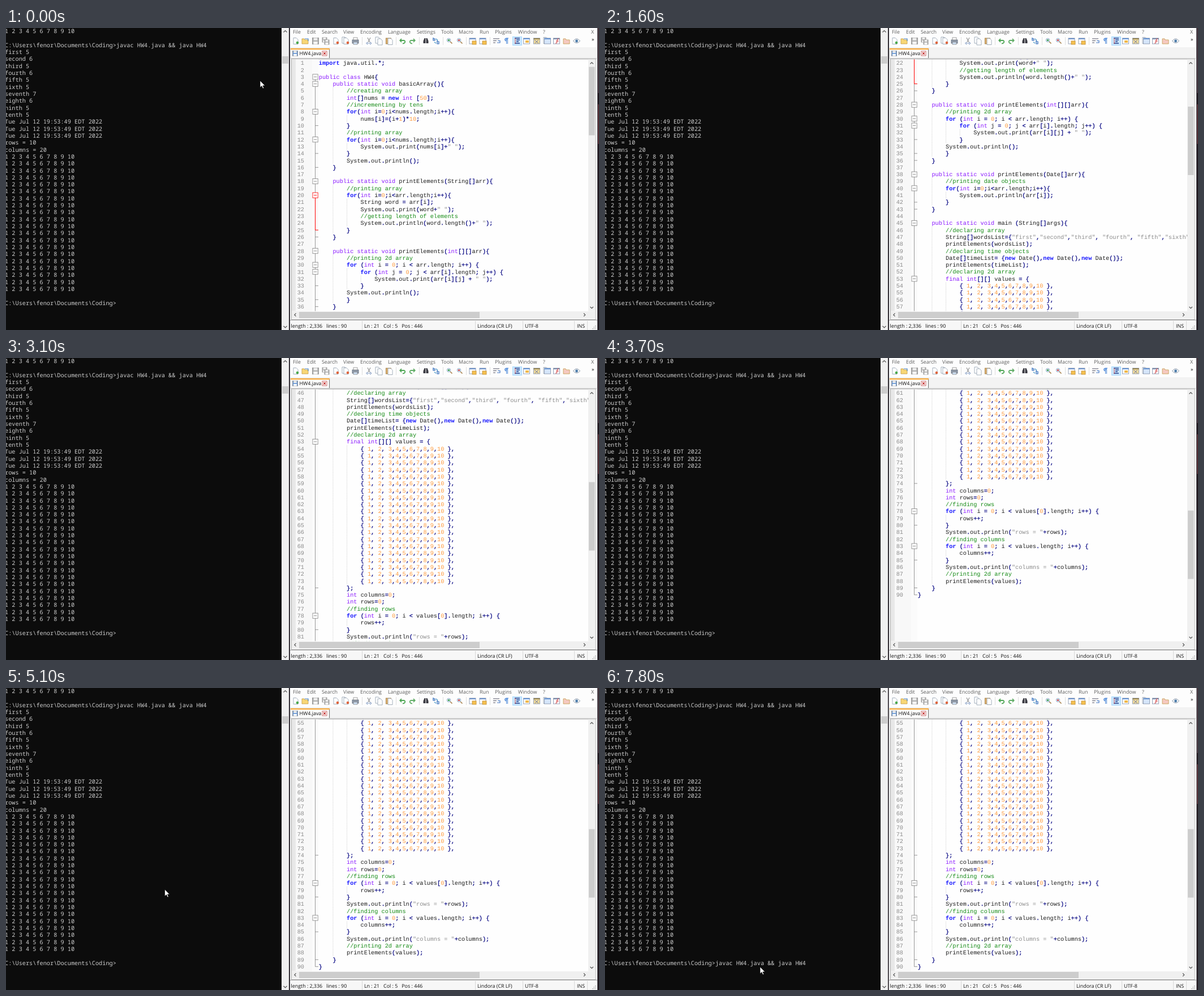
Animation of 1048 by 534 pixels, one loop 8000 ms. Source, as an HTML page:

```html
<!DOCTYPE html>
<html lang="en">
<head>
<meta charset="utf-8">
<title>Console and editor</title>
<style>
html, body { margin: 0; width: 100%; height: 100%; overflow: hidden; background: #0c0c0c; }
svg { display: block; width: 1048px; height: 534px; }
text { white-space: pre; text-rendering: geometricPrecision; }
.con { font: 10.26px "Noto Sans Mono", "DejaVu Sans Mono", monospace; fill: #ccc; }
.code { font: 10.26px "Liberation Mono", "Courier New", monospace; fill: #1c1c1c; }
.ui { font: 8.9px "Open Sans", "Noto Sans", sans-serif; fill: #111; }
.menu { fill: #5c5c5c; }
.num { fill: #8a8a8a; }
.note { fill: #148a14; }
.str { fill: #8c8c8c; }
.key { fill: #1414ff; font-weight: bold; }
.type { fill: #8a18ff; }
.digit { fill: #ff9a3c; }
.op { fill: #000080; stroke: #000080; stroke-width: 0.25px; }
</style>
</head>
<body>
<svg id="stage" viewBox="0 0 1048 534">
  <clipPath id="page"><rect x="505" y="55.5" width="524" height="445"/></clipPath>
</svg>
<script>
const stage = document.getElementById('stage');
const LOOP = 8000, ROW = 12.31, PITCH = 6.154;

function el(parent, tag, attrs, text) {
  const node = document.createElementNS('http://www.w3.org/2000/svg', tag);
  for (const k in attrs) node.setAttribute(k, attrs[k]);
  if (text !== undefined) node.textContent = text;
  parent.appendChild(node);
  return node;
}
const rect = (x, y, width, height, fill, stroke = 'none', g = stage) =>
  el(g, 'rect', { x, y, width, height, fill, stroke, 'stroke-width': 0.8 });
const path = (d, stroke, fill = 'none', w = 1, g = stage) =>
  el(g, 'path', { d, stroke, fill, 'stroke-width': w });
const dot = (cx, cy, r, fill, stroke = 'none') =>
  el(stage, 'circle', { cx, cy, r, fill, stroke, 'stroke-width': 0.8 });
const label = (x, y, text, cls = 'ui', g = stage) => el(g, 'text', { x, y, class: cls }, text);

// ---------- console ----------
const PROMPT = 'C:\\Users\\fenor\\Documents\\Coding>';
const COMMAND = 'javac HW4.java && java HW4';
const COUNT = '1 2 3 4 5 6 7 8 9 10';
const conX = col => -1.95 + col * PITCH;
const conY = row => 9.1 + row * 12.32;

const output = [
  COUNT, '', PROMPT + COMMAND,
  'first 5', 'second 6', 'third 5', 'fourth 6', 'fifth 5',
  'sixth 5', 'seventh 7', 'eighth 6', 'ninth 5', 'tenth 5',
  ...Array(3).fill('Tue Jul 12 19:53:49 EDT 2022'),
  'rows = 10', 'columns = 20',
  ...Array(20).fill(COUNT), '', PROMPT
];
rect(0, 0, 500, 534, '#0c0c0c');
output.forEach((s, i) => label(conX(0), conY(i), s, 'con'));
const typed = label(conX(32), conY(39), COMMAND, 'con');
const caret = rect(0, 0, 6, 3, '#ccc');

rect(487, 0, 13, 534, '#f0f0f0');
rect(488, 50, 11, 13, '#cdcdcd');
path('M490.5 7.5l3-3 3 3M490.5 527l3 3 3-3', '#555', 'none', 1.2);

// ---------- editor window ----------
rect(500, 0, 548, 534, '#241c22');
rect(1046, 0, 2, 115, '#4a3a42');
rect(1046, 135, 2, 70, '#5a343a');
rect(502, 0, 543, 534, '#f7f7f7');
rect(502, 0, 543, 34, '#fdfdfd');
const frame = path('M501.5 0V534M1045.5 0V534', '#3c3c44');

const menus = { File: 507, Edit: 532, Search: 558, View: 596, Encoding: 626, Language: 675,
  Settings: 726, Tools: 769, Macro: 800, Run: 837, Plugins: 864, Window: 905, '?': 949, X: 1034 };
for (const name in menus) label(menus[name], 10, name, 'ui menu');

// ---------- toolbar ----------
function sheet(x, badge, y = 23) {
  path(`M${x - 4} ${y - 5.5}h5l3 3v8h-8z`, '#8f9cad', '#fff', 0.8);
  if (badge) dot(x + 3, y + 3, 2.3, badge);
}
function disk(x, y, color, s = 11) {
  rect(x - s / 2, y - s / 2, s, s, color, '#888');
  rect(x - s * 0.3, y - s / 2, s * 0.6, s * 0.4, '#eee');
  rect(x - s * 0.32, y + s * 0.1, s * 0.64, s * 0.4, '#fff');
}
function panel(x, bar, body) {
  rect(x - 5.5, 18, 11, 10, body, '#7e8da8');
  rect(x - 5.5, 18, 11, 2, bar);
}
function lens(x, color) {
  path(`M${x + 1} 24l3.5 3.5`, '#a8834e', 'none', 1.6);
  dot(x - 1.5, 21.5, 3.2, '#d5e6f5', '#86a0be');
  dot(x - 1.5, 21.5, 1.6, color);
}
function folder(x, color) {
  path(`M${x - 6} 28v-9h4l1 2h6v7z`, '#c09a48', color, 0.8);
}
function sync(x) {
  panel(x - 0.5, '#6f92c8', '#fff');
  rect(x - 1, 23, 7, 6, '#f5c050', '#c08c30');
}

for (const x of [629, 689, 730, 772, 813, 855]) rect(x, 16, 0.8, 14, '#d6d6d6');
sheet(512, '#49a94b');
folder(529, '#f8d675');
path('M528 19h6v4', '#4a86c8', 'none', 1.2);
disk(547, 23, '#b0b0b0');
disk(563, 21, '#b8b8b8', 8);
disk(567, 25, '#b0b0b0', 8);
sheet(583, '#e0643c');
sheet(598, '', 21.5);
sheet(601, '#e0643c');
rect(612, 21, 11, 6, '#8f9aaa', '#5f6a7a');
rect(614, 17, 7, 4, '#fff', '#888');
rect(614, 25, 7, 4, '#cfe2f7', '#888');
path('M639 17l4 8M644 17l-4 8', '#777');
path('M638.5 25.5a1.5 1.5 0 1 0 .1 0M644 25.5a1.5 1.5 0 1 0 .1 0', '#4a6ea8', 'none', 0.9);
sheet(657, '', 21.5);
sheet(661, '', 24.5);
rect(671.5, 18, 9, 10, '#dfb270', '#96733a');
sheet(679, '', 24);
path('M697 22h6q3 .5 2 3.5q-1 2-4 2', '#4ea656', 'none', 1.8);
path('M699 18l-4 4 4 4z', 'none', '#4ea656');
path('M722 22h-6q-3 .5-2 3.5q1 2 4 2', '#62ae68', 'none', 1.8);
path('M720 18l4 4-4 4z', 'none', '#62ae68');
path('M737.5 27v-4l2-5h2v9zM746.5 27v-4l-2-5h-2v9z', 'none', '#3a3a42');
path('M755 17v5h3v-3h-3M762 22v6h3v-4h-3', '#2764b8', 'none', 1.2);
path('M760 19l3 3M757 25l3 2', '#3a8fc0', 'none', 1.2);
lens(784, '#38a040');
lens(802, '#d84040');
sync(825);
sync(843);
path('M861 19h11M861 22.5h6M861 26h4', '#556');
path('M869 22.5h4v3.5h-5', '#3a70c0', 'none', 1.1);
path('M884.5 28v-10M886.5 28v-10M888 18h-4a2.5 2.5 0 0 0 0 5', '#4a86d6', '#9cc0ee');
rect(895.5, 15.5, 16, 15, '#cce8ff', '#99d1ff');
path('M899 18h9M902 21h6M902 24h4M899 27h9', '#26408c', 'none', 1.4);
path('M900 18v10', '#d04040', 'none', 0.9);
panel(920, '#6592d0', '#fff');
rect(918, 22, 6, 4, '#f2b94c');
panel(938, '#8f8050', '#f4dd9c');
path('M934 21l7 6M941 21l-6 6', '#6a78a0');
sheet(954, '', 22);
panel(957, '#6592d0', '#d6e6fa');
panel(973, '#7a8aa8', '#fff');
path('M971 27q3 0 3-4t3-4M972 23h5', '#d64a4a', 'none', 1.2);
folder(991, '#f6c9c0');
path('M1002.5 23q6-8 12 0q-6 7-12 0z', '#78879a', '#fff', 0.9);
dot(1008.5, 23, 2.4, '#4a7aa8');
label(1035, 23, '»');

// ---------- tab ----------
rect(502, 34, 543, 19, '#f3f3f3');
rect(503, 36, 69, 17.5, '#fbfbfb', '#cfcfcf');
rect(571, 37, 1, 16, '#777');
rect(503, 36, 69, 2.2, '#faaa3c');
disk(511, 45, '#6b9ad6', 9);
label(518.5, 48.3, 'HW4.java');
rect(559, 41, 8, 8, '#fff', '#c04848');
path('M561 43l4 4M565 43l-4 4', '#c02828', 'none', 1.2);
rect(503, 53.5, 541, 0.9, '#b4b4b4');
rect(504.5, 55, 537.5, 460.5, '#fefefe', '#9a9a9a');
rect(505, 55.5, 7, 445, '#e8e8e8');
rect(512, 55.5, 29, 445, '#f8f8f8');
rect(541, 55.5, 11, 445, '#fbfbfb');

// ---------- code ----------
const source = `import java.util.*;

public class HW4{
    public static void basicArray(){
        //creating array
        int[]nums = new int [50];
        //incrementing by tens
        for(int i=0;i<nums.length;i++){
            nums[i]=(i+1)*10;
        }
        //printing array
        for(int i=0;i<nums.length;i++){
            System.out.print(nums[i]+" ");
        }
        System.out.println();
    }

    public static void printElements(String[]arr){
        //printing array
        for(int i=0;i<arr.length;i++){
            String word = arr[i];
            System.out.print(word+" ");
            //getting length of elements
            System.out.println(word.length()+" ");
        }
    }

    public static void printElements(int[][]arr){
        //printing 2d array
        for (int i = 0; i < arr.length; i++) {
            for (int j = 0; j < arr[i].length; j++) {
                System.out.print(arr[i][j] + " ");
            }
        System.out.println();
        }
    }

    public static void printElements(Date[]arr){
        //printing date objects
        for(int i=0;i<arr.length;i++){
            System.out.println(arr[i]);
        }
    }

    public static void main (String[]args){
        //declaring array
        String[]wordsList={"first","second","third", "fourth", "fifth","sixth","seventh"};
        printElements(wordsList);
        //declaring time objects
        Date[]timeList= {new Date(),new Date(),new Date()};
        printElements(timeList);
        //declaring 2d array
        final int[][] values = {
${Array(20).fill('            { 1, 2, 3,4,5,6,7,8,9,10 },').join('\n')}
        };
        int columns=0;
        int rows=0;
        //finding rows
        for (int i = 0; i < values[0].length; i++) {
            rows++;
        }
        System.out.println("rows = "+rows);
        //finding columns
        for (int i = 0; i < values.length; i++) {
            columns++;
        }
        System.out.println("columns = "+columns);
        //printing 2d array
        printElements(values);
    }
}`.split('\n');

const TOKEN = /(\/\/.*)|("[^"]*")|\b(import|for|new)\b|\b(public|static|void|class|int|final)\b|\b(\d+)\b|([^\w\s"]+)|\w+|\s+/g;
const KINDS = ['note', 'str', 'key', 'type', 'digit', 'op'];
const clip = el(stage, 'g', { 'clip-path': 'url(#page)' });
const page = el(clip, 'g', {});
const base = n => 65.2 + (n - 1) * ROW;
const mid = n => 61.8 + (n - 1) * ROW;

source.forEach((line, i) => {
  const n = i + 1, indent = line.search(/\S/);
  label(527 - String(n).length * PITCH, base(n), n, 'code num', page);
  for (let c = 4; c < indent; c += 4) {
    const guide = path(`M${553.3 + c * PITCH} ${mid(n) - 6}v${ROW}`, '#c8c8c8', 'none', 0.8, page);
    guide.setAttribute('stroke-dasharray', '0.8 0.75');
  }
  const text = label(552.8, base(n), undefined, 'code', page);
  for (const m of line.matchAll(TOKEN)) {
    const kind = KINDS[m.slice(1).findIndex(Boolean)];
    el(text, 'tspan', kind ? { class: kind } : {}, m[0]);
  }
});

const GRAY = '#808080', RED = '#ff0000';
path(`M546.5 ${mid(3)}V${mid(90)}h5.5`, GRAY, 'none', 0.8, page);
path(`M546.5 ${mid(20)}V${mid(25)}h5.5`, RED, 'none', 1, page);
for (const n of [10, 14, 16, 26, 33, 35, 36, 42, 43, 74, 80, 85, 89])
  path(`M546.5 ${mid(n)}h5.5`, GRAY, 'none', 0.8, page);
for (const n of [3, 4, 8, 12, 18, 20, 28, 30, 31, 38, 40, 45, 53, 78, 83]) {
  const color = n === 20 ? RED : GRAY;
  rect(542, mid(n) - 4.6, 9.2, 9.2, '#fff', color, page);
  path(`M544 ${mid(n)}h5.2`, color, 'none', 0.9, page);
}

// ---------- scrollbars and status ----------
rect(1029, 55.5, 12.5, 445, '#f0f0f0');
const thumb = rect(1030, 0, 10.5, 121, '#cdcdcd');
path('M1032.5 63.5l2.7-2.7 2.7 2.7M1032.5 493l2.7 2.7 2.7-2.7', '#555', 'none', 1.2);
rect(505, 501, 536.5, 13, '#f0f0f0');
rect(518, 502, 319, 11, '#cdcdcd');
path('M512.5 504.5l-2.7 2.7 2.7 2.7M1021 504.5l2.7 2.7-2.7 2.7', '#555', 'none', 1.2);

rect(502, 516, 543, 1, '#a4a4a4');
rect(502, 517, 543, 17, '#f7f7f7');
for (const x of [629, 829, 913, 1004, 1027]) rect(x, 518, 0.9, 16, '#d4d4d4');
label(503.5, 530, 'length : 2,336   lines : 90');
label(633, 530, 'Ln : 21   Col : 5   Pos : 446');
label(833, 530, 'Lindora (CR LF)');
label(917, 530, 'UTF-8');
label(1009, 530, 'INS');
for (let i = 0; i < 3; i++)
  for (let j = 0; j <= i; j++) rect(1041 - j * 2.5, 526 + i * 2.5, 1.3, 1.3, '#a0a0a0');

const arrow = path('M0 0V12.3L2.9 9.6 4.9 14 6.8 13.2 4.9 8.9H8.8Z', '#000', '#fff', 0.7);

// ---------- motion: [start time, value...] ----------
const SCROLL = [[0, 1], [1000, 4], [1100, 10], [1200, 13], [1500, 19], [1600, 22],
  [2200, 25], [2300, 31], [2400, 34], [2800, 37], [3000, 43], [3100, 46],
  [3500, 52], [3600, 55], [3700, 61], [3800, 64], [4000, 67], [4100, 70],
  [4600, 67], [4700, 58], [4800, 55]];
const POINTER = [[0, 449, 93], [300, 520, 125], [400, 624, 182], [500],
  [4800, 407, 310], [4900, 414, 318], [5100, 280.5, 356], [5200, 241, 418],
  [5300, 334, 442], [5500, 300, 472], [5600, 275, 492], [5800, 274, 493]];
const CARET = [[0], [6400, 32, 39], [6900, 58, 39], [7300], [7600, 0, 40], [7800]];

const at = (steps, t) => steps.findLast(s => s[0] <= t).slice(1);
const show = (node, on) => node.setAttribute('visibility', on ? 'visible' : 'hidden');

function draw(t) {
  const [first] = at(SCROLL, t);
  page.setAttribute('transform', `translate(0 ${-(first - 1) * ROW})`);
  thumb.setAttribute('y', 68.7 + (first - 1) * 3.35);

  const [px, py] = at(POINTER, t);
  show(arrow, px !== undefined);
  if (px !== undefined) arrow.setAttribute('transform', `translate(${px} ${py})`);

  const [col, row] = at(CARET, t);
  show(caret, col !== undefined);
  if (col !== undefined) {
    caret.setAttribute('x', conX(col));
    caret.setAttribute('y', conY(row) - 0.6);
  }
  show(typed, t >= 6900);
  frame.setAttribute('stroke', t < 6000 ? '#3c3c44' : '#77777c');
}

function tick() {
  draw(performance.now() % LOOP);
  requestAnimationFrame(tick);
}
tick();
</script>
</body>
</html>
```
